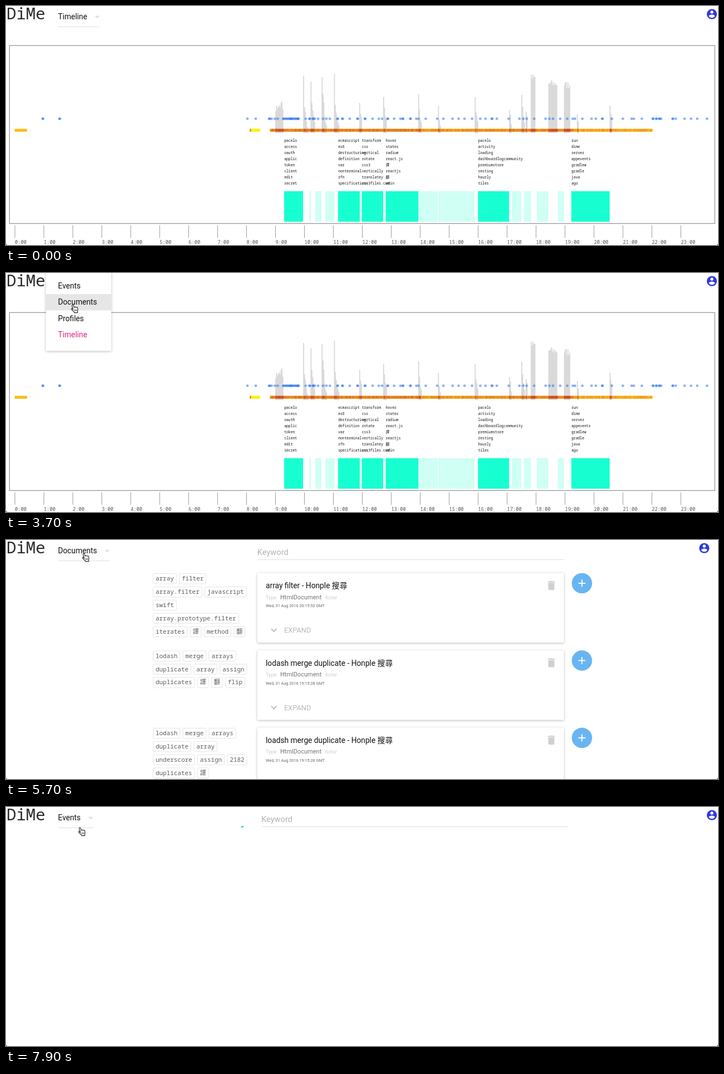
Animation, 1280 px wide and 431 px high, one loop 8000 ms. Source, as an HTML page:

```html
<!DOCTYPE html>
<html lang="en">
<head>
<meta charset="utf-8">
<title>DiMe</title>
<style>
html, body { margin: 0; width: 100%; height: 100%; overflow: hidden; background: #fff; }
svg { display: block; width: 100%; height: 100%; }
text { font-family: Roboto, "Noto Sans CJK TC", "Noto Sans CJK JP", sans-serif; white-space: pre; }
.mono { font-family: "Noto Sans Mono", "Noto Sans CJK TC", "Noto Sans CJK JP", monospace; }
.paper { fill: #fff; filter: drop-shadow(0 1px 2px rgba(0,0,0,.27)); }
</style>
</head>
<body>
<svg id="stage" viewBox="0 0 1280 431"></svg>
<script>
const LOOP = 8000;
const stage = document.getElementById('stage');

function add(parent, tag, attrs = {}, text) {
  const node = document.createElementNS('http://www.w3.org/2000/svg', tag);
  for (const key in attrs) node.setAttribute(key, attrs[key]);
  if (text !== undefined) node.textContent = text;
  parent.appendChild(node);
  return node;
}
const group = (parent = stage) => add(parent, 'g');
const rect = (parent, x, y, width, height, fill, more) =>
  add(parent, 'rect', { x, y, width, height, fill, ...more });
const label = (parent, x, y, size, fill, text, more) =>
  add(parent, 'text', { x, y, 'font-size': size, fill, ...more }, text);
const show = (node, on) => node.setAttribute('visibility', on ? 'visible' : 'hidden');
const clamp = v => Math.min(1, Math.max(0, v));
const span = (t, from, length) => clamp((t - from) / length);
const easeOut = p => 1 - (1 - p) ** 4;
const easeInOut = p => p * p * (3 - 2 * p);

let seed = 7;
function random() {
  seed = (seed * 16807) % 2147483647;
  return seed / 2147483647;
}

// ---- Timeline page ----
const timeline = group();
const BAR = 1.6, FLOOR = 229;

// Work sessions: left edge, width, keywords.
const sessions = [
  [500, 34, 'pacelo access oauth applic token client edit secret'],
  [597, 39, 'ecmascript es6 destructuring definition var nonterminal rfn specifications'],
  [639.5, 38.5, 'transform css vertical rotate css3 vertically translatey css3files.com'],
  [682.5, 59, 'hover states radium react.js 譯 reactjs 翻 odin'],
  [848.5, 56, 'pacelo activity loading dashboardlogcommunity premiumstore resting hourly tiles'],
  [1016.3, 69, 'run dime server appevents gradlew gradle java ago']
];
// Short visits between sessions: left edge, width.
const visitsBetween = [[545, 3], [556, 11], [574, 16.5], [742.5, 34], [777.5, 64.5], [909, 17.5],
  [931, 13], [954, 21], [992, 11]];

// Bursts of activity: left edge, height. Sustained ones also have a bar count.
const spikes = [[534.2, 103], [547.5, 93], [567.4, 101], [589.6, 107], [635, 54], [678, 65], [741, 70],
  [776.6, 49], [842.5, 65], [904.4, 41], [926.4, 69], [934.3, 38], [1026.4, 34], [1085, 49]];
const plateaus = [[484, 66, 9], [943.5, 106, 5], [975, 95, 10], [1003, 93, 7]];
const hot = [...plateaus.map(([x, , n]) => [x, x + n * BAR]),
  ...spikes.map(([x, h]) => [x, x + h * .045])];

const bar = (x, height) => rect(timeline, x, FLOOR - height, 1.7, height, '#d6d6d6');

function buildActivity() {
  for (const [x, height] of spikes)
    for (let i = 0, h = height; i < height / 20; i++, h *= .45 + random() * .4) bar(x + i * BAR, h);
  for (const [x, height, n] of plateaus)
    for (let i = 0; i < n; i++) bar(x + i * BAR, height * (height < 80 ? .5 + random() * .6 : .86 + random() * .15));
}

function buildDots() {
  const dot = cx => add(timeline, 'circle', { cx, cy: 203.3, r: 2.4, fill: '#2370f0', 'fill-opacity': .52 });
  [66, 66.5, 96, 97, 434, 449].forEach(dot);
  for (let x = 502; x <= 526; x += 2) dot(x);
  for (let x = 473; x < 1263; x += 3.5 + random() * (x < 750 ? 11 : 18)) {
    dot(x);
    if (random() < .2) dot(x + 1);
  }
}

function heatAt(x) {
  if (hot.some(([a, b]) => x >= a && x <= b)) return .85 + random() * .15;
  const base = x < 742 ? .42 : x < 900 ? .28 : x < 1020 ? .38 : .14;
  return base + random() * .22;
}
const heatColour = h => `hsl(${46 - 30 * h},${100 - 8 * h}%,${51 - 9 * h}%)`;

function buildHeat() {
  const strip = (x, width, fill) => rect(timeline, x, 221.5, width, 5.2, fill);
  strip(15.5, 22.3, '#ffba18');
  strip(438.3, 2.5, '#e38a08');
  strip(440.8, 16.2, '#fff200');
  for (let x = 474.5; x < 1162; x += 1.75) strip(x, 1.85, heatColour(heatAt(x)));
}

function buildTimeline() {
  rect(timeline, 6.3, 71.3, 1268, 321, 'none', { stroke: '#999', 'stroke-width': 1.3 });
  buildActivity();
  buildDots();
  buildHeat();
  for (const [x, width, words] of sessions) {
    rect(timeline, x, 334, width, 55, '#17ffd1');
    words.split(' ').forEach((word, i) =>
      label(timeline, x + .2, 244.7 + i * 11, 6.4, '#111', word, { class: 'mono' }));
  }
  for (const [x, width] of visitsBetween) rect(timeline, x, 334, width, 55, '#d0fff4');
  for (let h = 0; h < 24; h++) {
    const x = 16 + h * 52.05;
    add(timeline, 'path', { d: `M${x} 395.5V418`, stroke: '#999' });
    label(timeline, x, 429, 8.7, '#555', h + ':00', { class: 'mono' });
  }
}

// ---- Search field and documents ----
const search = group();
const documents = group();

const cards = [
  ['array filter - Honple 搜尋', '20:15:52',
    ['array filter', 'array.filter javascript', 'swift', 'array.prototype.filter', 'iterates 譯 method 翻']],
  ['lodash merge duplicate - Honple 搜尋', '19:15:28',
    ['lodash merge arrays', 'duplicate array assign', 'duplicates 譯 翻 flip']],
  ['loadsh merge duplicate - Honple 搜尋', '19:15:26',
    ['lodash merge arrays', 'duplicate array', 'underscore assign 2182', 'duplicates 譯']]
];

function buildTags(parent, lines) {
  lines.forEach((line, row) => {
    let x = 264.5;
    for (const word of line.split(' ')) {
      const cjk = word.charCodeAt(0) > 255;
      const width = (cjk ? 10.9 : word.length * 6.57) + 8.9;
      const y = 60.5 + row * 23.9;
      rect(parent, x, y, width, 18.5, '#fff', { rx: 2, stroke: '#e4e4e4' });
      label(parent, x + 4.5, y + 12.8, 10.95, '#5c5c5c', word, { class: 'mono' });
      x += width + 5.2;
    }
  });
}

function buildCard([title, time, tags], i) {
  const card = group(documents);
  card.setAttribute('transform', `translate(0 ${i * 139.4})`);
  buildTags(card, tags);
  add(card, 'rect', { x: 452, y: 59.5, width: 551, height: 125.5, rx: 1.5, class: 'paper' });
  label(card, 467, 87.4, 13.75, '#111', title);
  label(card, 467, 106.6, 9.1, '#ccc', 'Type');
  label(card, 493, 106.6, 11, '#757575', 'HtmlDocument');
  label(card, 573.3, 106.6, 9.1, '#ccc', 'Actor');
  label(card, 467, 121.4, 7.3, '#666', `Wed, 31 Aug 2016 ${time} GMT`);
  add(card, 'path', { d: 'M476.8 160.2l4.8 4.8l4.8-4.8', fill: 'none', stroke: '#b8b8b8', 'stroke-width': 1.9 });
  label(card, 500, 167.2, 12.8, '#b8b8b8', 'EXPAND');
  add(card, 'path', {
    d: 'M6 19c0 1.1.9 2 2 2h8c1.1 0 2-.9 2-2V7H6zM19 4h-3.5l-1-1h-5l-1 1H5v2h14z',
    fill: '#d0d0d0', transform: 'translate(969.4 70.9) scale(.916)'
  });
  add(card, 'circle', { cx: 1035.4, cy: 78, r: 18.3, fill: '#69b5f2' });
  add(card, 'path', { d: 'M1029 78h12.8M1035.4 71.6v12.8', stroke: '#fff', 'stroke-width': 1.9 });
}

buildTimeline();
cards.forEach(buildCard);
label(search, 459, 26.7, 14.65, '#b3b3b3', 'Keyword');
add(search, 'path', { d: 'M459.5 35.5H1010.3', stroke: '#e0e0e0' });

const spinner = add(stage, 'circle', { cx: 422, cy: 23, r: 13, fill: 'none', stroke: '#1cc8ac', 'stroke-width': 2.1 });

// ---- Header ----
const PICK_X = 93.5;
label(stage, 1, 24.4, 29, '#2b2b2b', 'DiMe', { class: 'mono' });
const pick = label(stage, PICK_X, 24.2, 13.75, '#111', '');
const underline = add(stage, 'path', { stroke: '#e0e0e0' });
const caret = add(stage, 'path', { d: 'M-4.6 17.7h9.2l-4.6 4.6z', fill: '#e0e0e0' });
const account = add(stage, 'path', {
  d: 'M12 2a10 10 0 1 0 0 20a10 10 0 0 0 0-20zm0 3a3 3 0 1 1 0 6a3 3 0 0 1 0-6zm0 14.2c-2.5 0-4.71-1.28-6-3.22' +
    '.03-1.99 4-3.08 6-3.08s5.97 1.09 6 3.08c-1.29 1.94-3.5 3.22-6 3.22z',
  fill: '#303ad9', 'fill-rule': 'evenodd'
});

// ---- Menu ----
const ROW = 29.4, MENU_TOP = 8.6;
const items = ['Events', 'Documents', 'Profiles', 'Timeline'];
const menu = group();
add(menu, 'rect', { x: 71.7, y: -6.5, width: 117.6, height: 147, rx: 1.5, class: 'paper' });
const hover = rect(menu, 71.7, MENU_TOP, 117.6, ROW, '#e6e6e6');
const itemLabels = items.map((name, i) => label(menu, PICK_X, MENU_TOP + ROW * i + 19.2, 13.75, '#111', name));

// ---- Pointer ----
const pointer = group();
add(pointer, 'path', {
  d: 'M4.8 10.5L2.6 3a1.3 1.3 0 0 1 2.5-.8L6.3 6a1.3 1.2 0 0 1 2.2-.2a1.3 1.2 0 0 1 2.1.3a1.2 1.2 0 0 1 2 .8' +
    'C13.4 9.4 13.4 11 12.6 13V15.6H6.8L6.4 14.2C4.6 12.8 2.6 10.6 1.4 9.4a1.1 1.1 0 0 1 1.6-1.4z',
  fill: '#fff', stroke: '#222', 'stroke-width': 1.1, 'stroke-linejoin': 'round'
});
add(pointer, 'path', { d: 'M7.4 9.8v3M9.2 9.8v3M11 9.8v3', stroke: '#222', 'stroke-width': .8 });

for (const d of ['M0 428v3h3q-3 0-3-3z', 'M1280 428v3h-3q3 0 3-3z']) add(stage, 'path', { d, fill: '#222' });

// ---- Motion ----
const openings = [
  { click: 2250, open: 2410, close: 3920 },
  { click: 5980, open: 6050, close: 6970 }
];
const pages = [
  { from: 0, name: 'Timeline' },
  { from: 4540, name: 'Documents', loaded: 5300 },
  { from: 7490, name: 'Events', loaded: Infinity }
];
const moves = [
  { at: 1300, length: 400, to: [116, 21] },
  { at: 2900, length: 600, to: [116, 56] },
  { at: 4000, length: 450, to: [136, 23] },
  { at: 6120, length: 330, to: [130, 35] },
  { at: 6900, length: 200, to: [129, 36] }
];

function pointerAt(t) {
  let [x, y] = [150, 45];
  for (const { at, length, to } of moves) {
    const p = easeInOut(span(t, at, length));
    x += (to[0] - x) * p;
    y += (to[1] - y) * p;
  }
  return [x, y];
}

function drawSpinner(local) {
  const p = easeInOut(span(local, 260, 750)), round = 2 * Math.PI * 13;
  spinner.setAttribute('stroke-dasharray', `${2.4 + .65 * round * p} ${round}`);
  spinner.setAttribute('transform', `rotate(${Math.max(0, local) * .18 + 108 * p} 422 23)`);
}

function drawMenu(t, page, y) {
  const visit = openings.find(v => t < v.close + 500) || openings[1];
  const leaving = t > visit.close;
  const grow = length => leaving
    ? 1 - easeOut(span(t, visit.close, length))
    : easeOut(span(t, visit.open, length));
  const sx = grow(250), sy = grow(450);
  show(menu, sx > .001);
  menu.setAttribute('opacity', sx);
  menu.setAttribute('transform', `translate(71.7 -6.5) scale(${sx} ${sy}) translate(-71.7 6.5)`);
  const row = Math.floor((y + 1 - MENU_TOP) / ROW);
  hover.setAttribute('y', MENU_TOP + ROW * row);
  itemLabels.forEach((node, i) => node.setAttribute('fill', items[i] === page.name ? '#d6287f' : '#111'));
  pick.setAttribute('opacity', leaving ? span(t, visit.close + 100, 200) : 1 - span(t, visit.click, 100));
}

// The underline and caret follow the width of the chosen name.
function drawPick(name) {
  if (pick.textContent === name) return;
  pick.textContent = name;
  const end = PICK_X + pick.getComputedTextLength() + 22;
  underline.setAttribute('d', `M93.7 37.5H${end}`);
  caret.setAttribute('transform', `translate(${end - 3.9} 0)`);
}

function draw(t) {
  const page = pages.filter(p => t >= p.from).pop();
  const loaded = t >= page.loaded, onTimeline = page === pages[0];
  show(timeline, onTimeline);
  show(search, !onTimeline);
  show(documents, loaded);
  show(spinner, !onTimeline && !loaded);
  drawSpinner(t - page.from - 60);
  drawPick(page.name);

  search.setAttribute('transform', `translate(${loaded ? -7.3 : 0} 0)`);
  account.setAttribute('transform', `translate(${loaded ? 1244.3 : 1258} 3.7) scale(.916)`);

  const [x, y] = pointerAt(t);
  show(pointer, t >= moves[0].at);
  pointer.setAttribute('transform', `translate(${x} ${y})`);
  drawMenu(t, page, y);
}

const start = performance.now();
function tick() {
  draw((performance.now() - start) % LOOP);
  requestAnimationFrame(tick);
}
tick();
</script>
</body>
</html>
```
